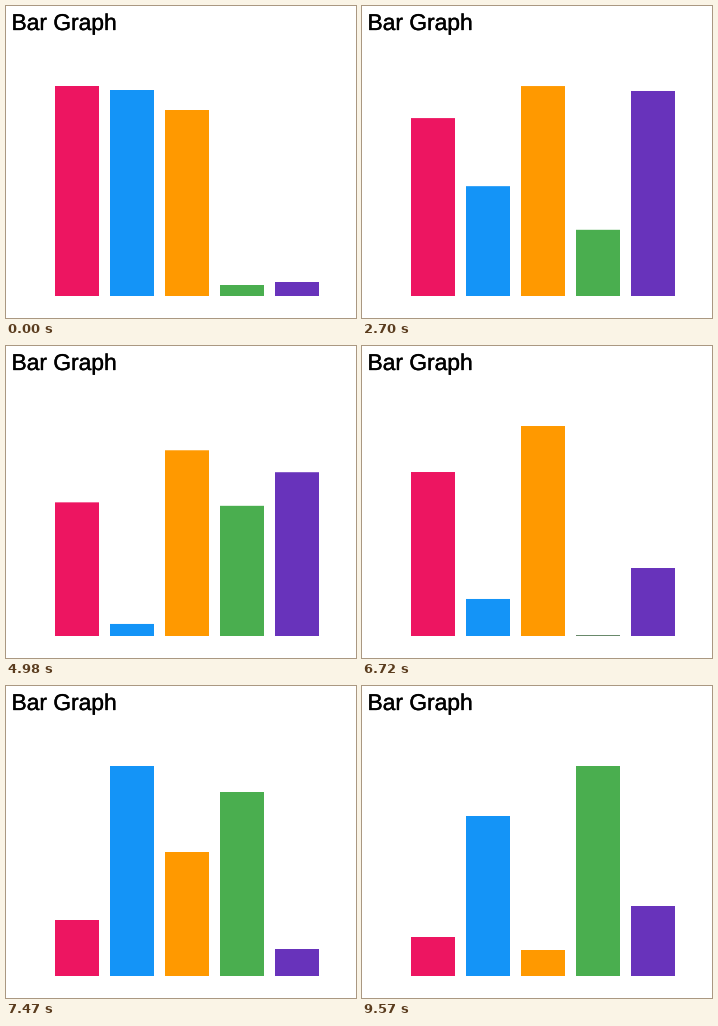
These frames come from a looping animation (350x312 px, 9.93 s). A matplotlib script:

```python
import matplotlib.pyplot as plt
import numpy as np
from matplotlib.animation import FuncAnimation
from matplotlib.colors import to_rgb
from matplotlib.patches import Rectangle
from matplotlib.patheffects import withStroke

W, H, DPI = 350, 312, 100
STEP, LOOP = 30, 9930
BASE, BAR_W, PITCH, LEFT = 290, 44, 55, 49

COLORS = ["#ed1561", "#1494f7", "#ff9900", "#4aae4f", "#6833bb"]

# Charted data: one row per data set, one bar height per colour
DATA = np.array([
    [210, 206, 186, 11, 14],
    [178, 110, 210, 66, 205],
    [119, 0, 174, 193, 210],
    [164, 37, 210, 0, 68],
    [56, 210, 124, 184, 27],
    [39, 160, 26, 210, 70],
])
STARTS = np.array([575, 2645, 4655, 6695, 8780])  # ms
DURATION = 750


def ease(u):
    u = np.clip(u, 0, 1)
    return np.where(u < 0.5, 4 * u**3, 1 - 4 * (1 - u) ** 3)


def heights_at(t):
    return DATA[0] + ease((t - STARTS) / DURATION) @ np.diff(DATA, axis=0)


def dulled(color):
    return [0.3 * c + 0.33 for c in to_rgb(color)]


def add_box(x, height, color):
    return ax.add_patch(Rectangle((x, BASE), BAR_W, -height, fc=color, lw=0,
                                  snap=False))


fig = plt.figure(figsize=(W / DPI, H / DPI), dpi=DPI, facecolor="white")
ax = fig.add_axes([0, 0, 1, 1])
ax.set_xlim(0, W)
ax.set_ylim(H, 0)
ax.axis("off")

ax.text(5.5, 24, "Bar Graph", family="Liberation Sans", color="black",
        size=22.8 * 72 / DPI, va="baseline",
        path_effects=[withStroke(linewidth=0.25, foreground="black")])

bars = []
for i, color in enumerate(COLORS):
    x = LEFT + i * PITCH
    add_box(x, 1, dulled(color))  # thin line left by an empty bar
    bars.append(add_box(x, 0, color))


def draw(frame):
    for bar, height in zip(bars, heights_at(frame * STEP)):
        bar.set_height(-height)
    return bars


anim = FuncAnimation(fig, draw, frames=LOOP // STEP, interval=STEP,
                     repeat=True, repeat_delay=0)
plt.show()
```
